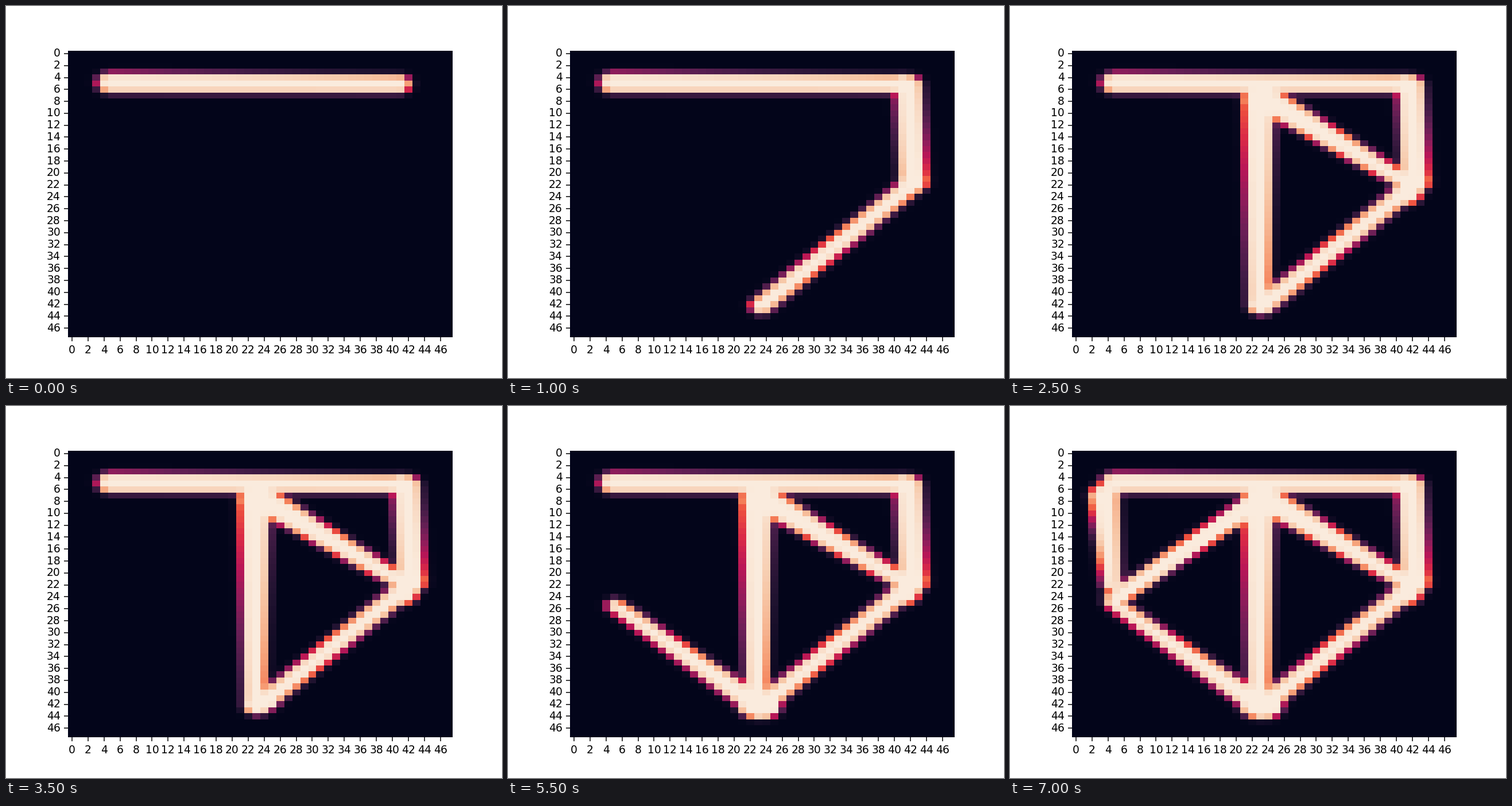
Animation of 864 by 648 pixels, one loop 7500 ms. Source, as a matplotlib script:

```python
import matplotlib.pyplot as plt
import numpy as np
from matplotlib.animation import FuncAnimation
from matplotlib.colors import LinearSegmentedColormap

N = 48
SHARPNESS = 4.5

ROCKET = LinearSegmentedColormap.from_list("rocket", [
    "#03051a", "#221331", "#451c47", "#6a1f56", "#921c5b", "#b91657",
    "#d92847", "#ed503e", "#f47d57", "#f6a47c", "#f7c9aa", "#faebdd"])

# Corners of the drawing as column + row * j
TOP_LEFT, TOP_RIGHT = 4.8 + 4.87j, 41.8 + 5.4j
LEFT, RIGHT = 4.65 + 24.5j, 42.35 + 21.8j
HUB, FOOT = 22.8 + 7.7j, 23.4 + 42.2j

rows, cols = np.mgrid[:N, :N]
cells = cols + 1j * rows


def stroke(start, end, w0, w1):
    """Ink of a soft line whose half width tapers from w0 to w1."""
    run = end - start
    t = ((cells - start) * np.conj(run)).real / max(abs(run) ** 2, 1e-9)
    t = np.clip(t, 0, 1)
    edge = w0 + (w1 - w0) * t - abs(cells - start - t * run)
    return 1 / (1 + np.exp(-SHARPNESS * edge))


def dab(at, w):
    return stroke(at, at, w, w)


strokes = [
    stroke(TOP_LEFT, TOP_RIGHT - 1 - 0.3j, 1.74, 1.52),
    stroke(TOP_RIGHT, RIGHT - 0.5j, 1.72, 1.76),
    stroke(RIGHT, FOOT, 1.45, 1.45),
    stroke(FOOT - 0.6, HUB, 1.38, 1.95),
    stroke(HUB + 0.5 - 0.4j, RIGHT - 1.5 - 0.5j, 2.1, 1.3),
    dab(RIGHT - 0.85 + 1.8j, 1.58),
    dab(RIGHT - 3.2 + 4.8j, 0.3),
    dab(FOOT + 1.2 - 0.6j, 1.0),
    dab(FOOT + 0.1 + 0.7j, 1.25),
    stroke(FOOT - 0.7 + 0.5j, FOOT + 0.8 + 0.4j, 1.47, 1.47),
    stroke(FOOT + 0.4, FOOT - 1.3 + 0.1j, 1.65, 1.65),
    stroke(FOOT - 2.4 - 1.8j, LEFT + 0.5 + 1j, 1.7, 1.15),
    stroke(LEFT, HUB - 1.8 + 1.6j, 1.2, 1.36),
    stroke(HUB - 1.2 + 1.2j, LEFT + 1.4 - 1.2j, 1.35, 1.1),
    stroke(LEFT - 0.2 - 2.5j, TOP_LEFT - 1.3 + 2.1j, 1.2, 1.87),
]

# Each stroke covers part of what the earlier ones left blank
canvases = 1 - np.cumprod([1 - s for s in strokes], axis=0)

fig, ax = plt.subplots(figsize=(6.4, 4.8), dpi=135)
mesh = ax.pcolormesh(canvases[0], cmap=ROCKET, vmin=0, vmax=1, linewidth=0)
ax.set(xlim=(0, N), ylim=(N, 0))
ax.spines[:].set_visible(False)
labels = np.arange(0, N, 2)
ax.set_xticks(labels + 0.5, labels)
ax.set_yticks(labels + 0.5, labels, va="center")


def update(i):
    mesh.set_array(canvases[i])
    return [mesh]


anim = FuncAnimation(fig, update, frames=len(strokes), interval=500,
                     repeat=True, repeat_delay=0)
plt.show()
```
